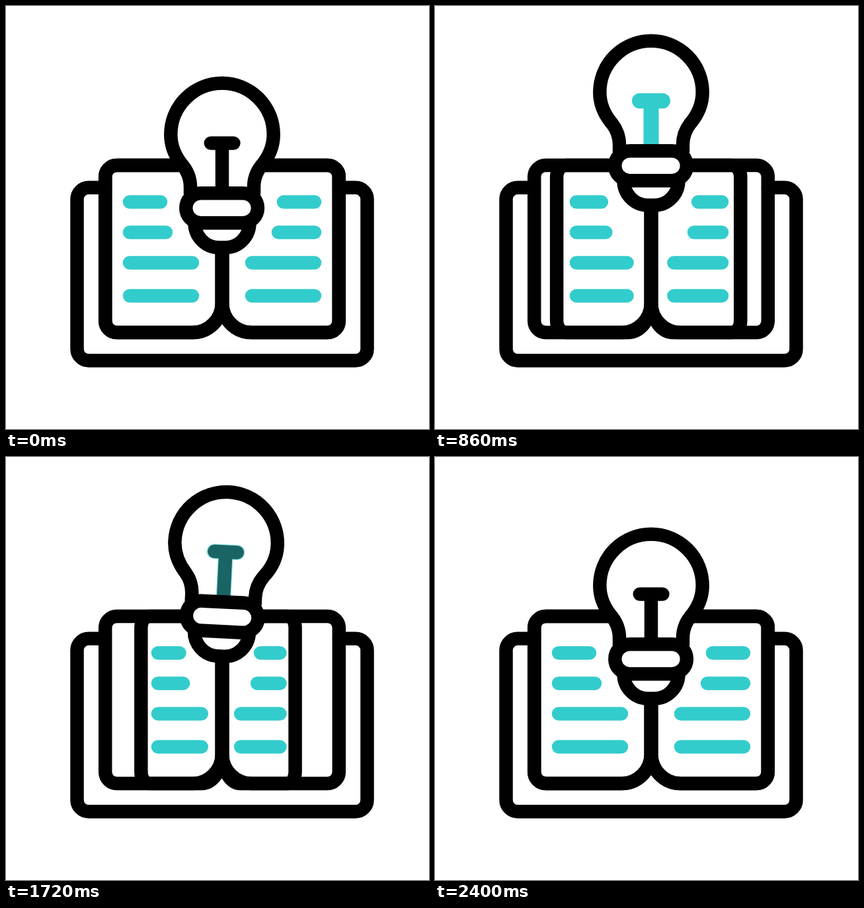
These frames come from a looping animation (640 px wide and 640 px high, 2.62 s). An HTML page:

```html
<!DOCTYPE html>
<html lang="en">
<head>
<meta charset="utf-8">
<title>Book and bulb</title>
<style>
  html, body { margin: 0; width: 100%; height: 100%; overflow: hidden; background: #fff; }
  svg { display: block; width: 100vw; height: 100vh; }
  path, rect { fill: none; stroke: #000; stroke-width: 20.5; stroke-linecap: round; stroke-linejoin: round; }
  #bulb .solid { fill: #fff; }
  #bulb .glow { stroke: #3cc; stroke-width: 23; }
  .text { stroke: #3cc; }
</style>
</head>
<body>
<svg viewBox="0 0 640 640">
  <path d="M150 274.8H125a17.5 17.5 0 0 0-17.5 17.5V519a17.5 17.5 0 0 0 17.5 17.5H529a17.5 17.5 0 0 0 17.5-17.5V292.3a17.5 17.5 0 0 0-17.5-17.5H504"/>
  <g id="book"></g>
  <g id="bulb">
    <path class="solid" d="M279 284V274C279 262 275 251 268 242C256 228 249.3 213 249.3 194.5A77.7 77.7 0 1 1 404.7 194.5C404.7 213 398 228 386 242C379 251 375 262 375 274V284"/>
    <path d="M309.8 207.5H344.4M327 207.5V283"/>
    <path class="glow" id="glow" d="M309.5 207.5H344.5M327 207.5V283"/>
    <path class="solid" d="M285.5 328C285.5 349 302 365.5 322 365.5H332C352 365.5 368.5 349 368.5 328"/>
    <rect class="solid" x="272.3" y="283.2" width="108.6" height="45" rx="22.5"/>
  </g>
</svg>
<script>
const LOOP = 2620, END = 2400, CYCLE = 1200, SPINE = 327;
const book = document.getElementById('book');
const bulb = document.getElementById('bulb');
const glow = document.getElementById('glow');

const ease = u => {
  u = Math.min(1, Math.max(0, u));
  return u * u * (3 - 2 * u);
};

// Eased value at time t through [time, value] keys
function keyed(keys, t) {
  let v = keys[0][1];
  for (let i = 1; i < keys.length; i++) {
    const [t0, v0] = keys[i - 1], [t1, v1] = keys[i];
    if (t >= t0) v = v0 + (v1 - v0) * ease((t - t0) / (t1 - t0));
  }
  return v;
}

// Page outline; k is the signed width factor, measured from the spine
function pagePath(k) {
  const x = n => SPINE + Math.sign(k) * 0.3 + n * k;
  return `M${x(0)} 241H${x(159)}C${x(169)} 241 ${x(176.5)} 249 ${x(176.5)} 258.5V476.5` +
    `C${x(176.5)} 486 ${x(169)} 494 ${x(159)} 494H${x(44)}C${x(20)} 494 ${x(0)} 474 ${x(0)} 450Z`;
}

function textPath(k) {
  const rows = [[296.5, 93], [342.5, 85], [388.5, 45], [438.5, 45]];
  return rows.map(([y, n]) => `M${SPINE + 140 * k} ${y}H${SPINE + n * k}`).join('');
}

function addPath(cls) {
  const p = document.createElementNS('http://www.w3.org/2000/svg', 'path');
  if (cls) p.setAttribute('class', cls);
  book.appendChild(p);
  return p;
}

const sides = [[-1, 0.322], [1, 0.394]].map(([dir, squeeze]) => {
  addPath().setAttribute('d', pagePath(dir));
  return { dir, squeeze, page: addPath(), text: addPath('text') };
});

const lift = [[0, 0], [400, -64], [2000, -64], [2400, 0]];
const tilt = [[120, 0], [340, -7], [700, 12.5], [850, 0]];
const light = [[600, 0], [760, 1], [1640, 1], [1800, 0]];

function draw(t) {
  const c = t % CYCLE;
  const fold = ease(1 - Math.abs(c - CYCLE / 2) / (CYCLE / 2));
  for (const s of sides) {
    const k = s.dir * (1 - s.squeeze * fold);
    s.page.setAttribute('d', pagePath(k));
    s.text.setAttribute('d', textPath(k));
  }
  bulb.setAttribute('transform', `translate(0 ${keyed(lift, t)}) rotate(${keyed(tilt, c)} ${SPINE} 318)`);
  glow.setAttribute('opacity', keyed(light, t));
}

const start = performance.now();
function tick() {
  draw(Math.min((performance.now() - start) % LOOP, END));
  requestAnimationFrame(tick);
}
tick();
</script>
</body>
</html>
```
